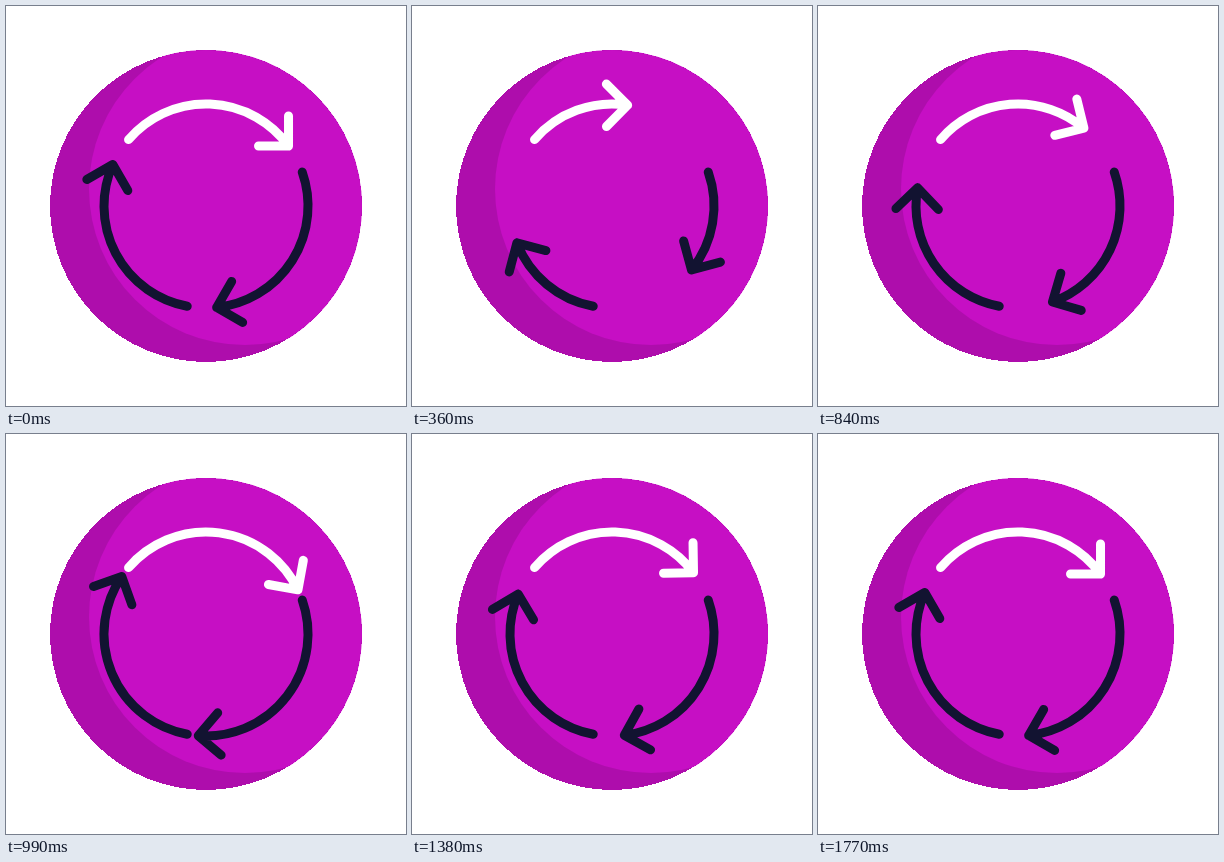
Write an HTML page that moves like this. It is 400x400 px and loops after 1.83 s.

```html
<!DOCTYPE html>
<html lang="en">
<head>
<meta charset="utf-8">
<title>Cycle arrows</title>
<style>
  html, body { margin: 0; width: 100%; height: 100%; overflow: hidden; background: #fff; }
  svg { display: block; width: 100vw; height: 100vh; }
  .arrow { fill: none; stroke: #121331; stroke-width: 9; stroke-linecap: round; stroke-linejoin: round; }
  .arrow.light { stroke: #fff; }
</style>
</head>
<body>
<svg viewBox="0 0 400 400">
  <clipPath id="disc"><circle cx="200" cy="200" r="156"/></clipPath>
  <circle cx="200" cy="200" r="156" fill="#ae0dac" shape-rendering="crispEdges"/>
  <circle cx="239" cy="183" r="156" fill="#c60fc4" clip-path="url(#disc)"/>
  <g transform="translate(200 200)">
    <path class="arrow light"/>
    <path class="arrow" transform="rotate(120)"/>
    <path class="arrow" transform="rotate(240)"/>
  </g>
</svg>
<script>
const STEP = 30, LOOP = 1830, LAST_STEP = 59;
const RADIUS = 102, BARB = 30, HEAD_LEAN = 9;
const START = -139.4, REST = -36, PULL = 48.2;
const PULLED = 18, RELEASED = 29.5;
const arrows = document.querySelectorAll('.arrow');

const polar = (r, deg) => {
  const a = deg * Math.PI / 180;
  return [r * Math.cos(a), r * Math.sin(a)];
};

const point = ([x, y]) => `${x.toFixed(2)} ${y.toFixed(2)}`;

// Cubic easing with flat ends; x1 and x2 are the handle positions.
function ease(x, x1, x2) {
  let lo = 0, hi = 1;
  for (let i = 0; i < 24; i++) {
    const s = (lo + hi) / 2, r = 1 - s;
    if (3 * x1 * s * r * r + 3 * x2 * s * s * r + s ** 3 < x) lo = s;
    else hi = s;
  }
  return lo * lo * (3 - 2 * lo);
}

// Tip angle: pull back, accelerate forward, then ring out.
function tipAngle(step) {
  if (step < PULLED) return REST - PULL * ease(step / PULLED, 0.3, 0.12);
  if (step < RELEASED) {
    const p = (step - PULLED) / (RELEASED - PULLED);
    return REST - PULL * (1 - p ** 2.4);
  }
  const t = step - RELEASED;
  const fade = 1 - (t / 29.5) ** 6;
  return REST + 15.9 * Math.exp(-0.088 * t) * Math.sin(2 * Math.PI * t / 10.7) * fade;
}

function arrowPath(angle) {
  const tip = polar(RADIUS, angle);
  const back = angle - 90 - HEAD_LEAN;
  const barb = turn => {
    const [x, y] = polar(BARB, back + turn);
    return point([tip[0] + x, tip[1] + y]);
  };
  return `M${point(polar(RADIUS, START))}A${RADIUS} ${RADIUS} 0 0 1 ${point(tip)}` +
    `M${barb(45)}L${point(tip)}L${barb(-45)}`;
}

function draw(ms) {
  const step = Math.min(Math.floor(ms % LOOP / STEP), LAST_STEP);
  const d = arrowPath(tipAngle(step));
  arrows.forEach(arrow => arrow.setAttribute('d', d));
}

const began = performance.now();
function tick() {
  draw(performance.now() - began);
  requestAnimationFrame(tick);
}
tick();
</script>
</body>
</html>
```
